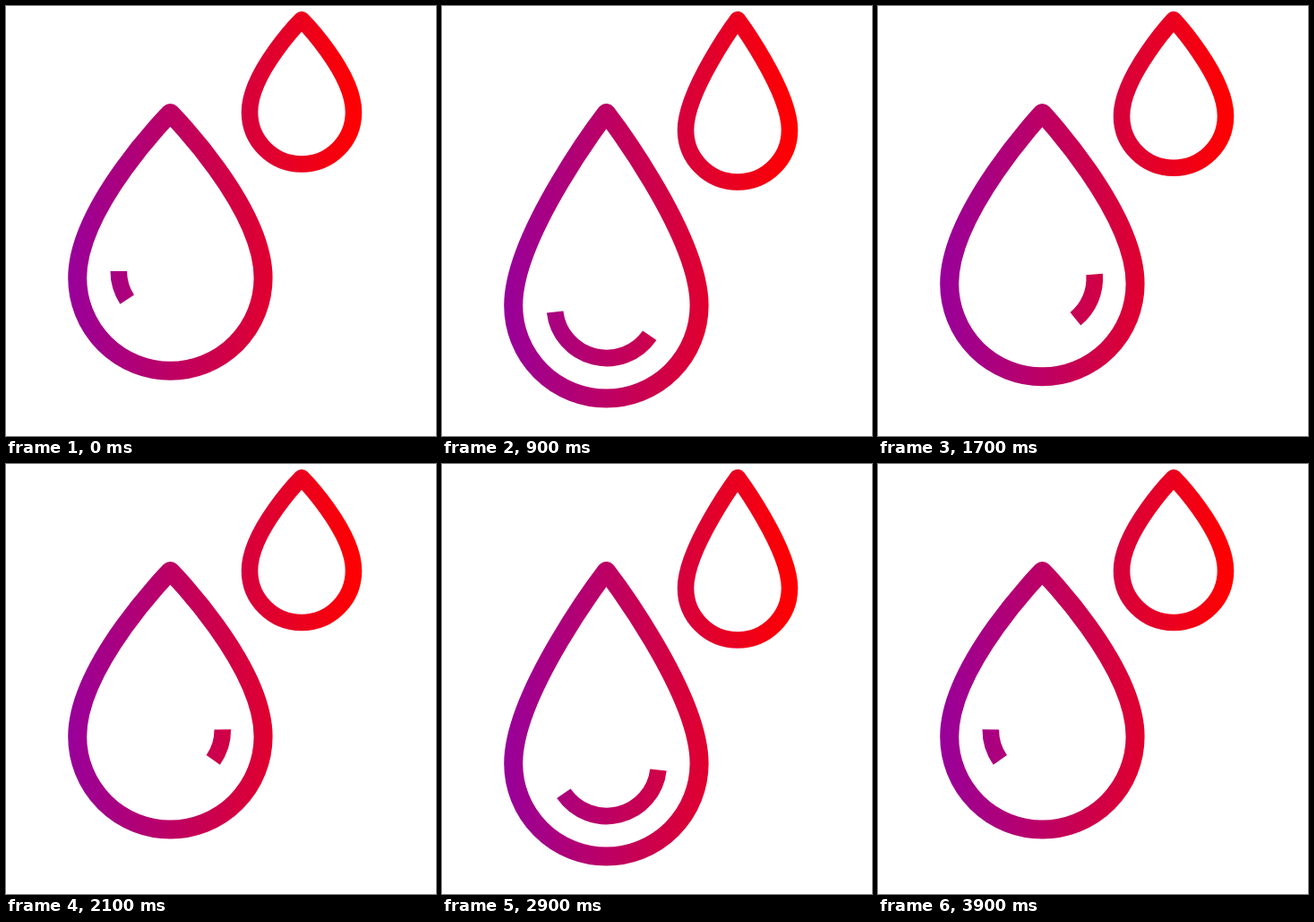
Recreate the animation shown at these times as an HTML page. Size 480 by 480 pixels, loop 4 s.

```html
<!DOCTYPE html>
<html lang="en">
<head>
<meta charset="utf-8">
<title>Drops</title>
<style>
  html, body { margin: 0; width: 100%; height: 100%; overflow: hidden; background: #fff; }
  svg { display: block; width: 100vw; height: 100vh; }
</style>
</head>
<body>
<svg viewBox="0 0 480 480">
  <defs>
    <linearGradient id="ink" gradientUnits="userSpaceOnUse" x1="72" y1="0" x2="394" y2="0">
      <stop offset="0" stop-color="#990099"/>
      <stop offset="1" stop-color="#ff0000"/>
    </linearGradient>
  </defs>
  <g fill="none" stroke="url(#ink)" stroke-linejoin="round">
    <path id="big" stroke-width="21"/>
    <path id="small" stroke-width="18.6"/>
    <path id="shine" stroke-width="18.6"/>
  </g>
</svg>
<script>
const LOOP = 4000, STEP = 100;
const BIG = { x: 183.4, tip: 119.5, y: 303.5, r: 103.7, fall: 31.5 };
const SMALL = { x: 330, tip: 15.3, y: 118.5, r: 58, fall: 20.5 };
const SHINE = { x: 183.8, y: 296, r: 58, fall: 40 };
const $ = id => document.getElementById(id);

// Pointed top, round bottom; the round part sinks by fall * s.
function drop({ x, tip, y, r, fall }, s) {
  const cy = y + fall * s, hy = cy - 0.77 * r;
  return `M${x} ${tip}C${x} ${tip} ${x - r} ${hy} ${x - r} ${cy}` +
    `A${r} ${r} 0 0 0 ${x + r} ${cy}C${x + r} ${hy} ${x} ${tip} ${x} ${tip}Z`;
}

// Angles in degrees, clockwise from the right.
function arc({ x, y, r, fall }, s, from, to) {
  const at = deg => {
    const a = deg * Math.PI / 180;
    return `${x + r * Math.cos(a)} ${y + fall * s + r * Math.sin(a)}`;
  };
  return `M${at(from)}A${r} ${r} 0 0 1 ${at(to)}`;
}

function draw(ms) {
  const t = (Math.floor(ms / STEP) * STEP) % LOOP / 1000;
  const sink = (1 - Math.cos(Math.PI * t)) / 2;
  const p = 1 - Math.abs(1 - t % 2);          // 0 at the sides, 1 at the bottom
  const side = t < 1 || t >= 3 ? 1 : -1;      // left or right half of the swing
  const mid = 90 + side * 73.5 * (1 - p * p);
  const half = (33 + 109 * sink) / 2;

  $('big').setAttribute('d', drop(BIG, sink));
  $('small').setAttribute('d', drop(SMALL, sink));
  $('shine').setAttribute('d', arc(SHINE, sink, mid - half, mid + half));
}

let start = null;
function tick(now) {
  if (start === null) start = now;
  draw(now - start);
  requestAnimationFrame(tick);
}
draw(0);
requestAnimationFrame(tick);
</script>
</body>
</html>
```
